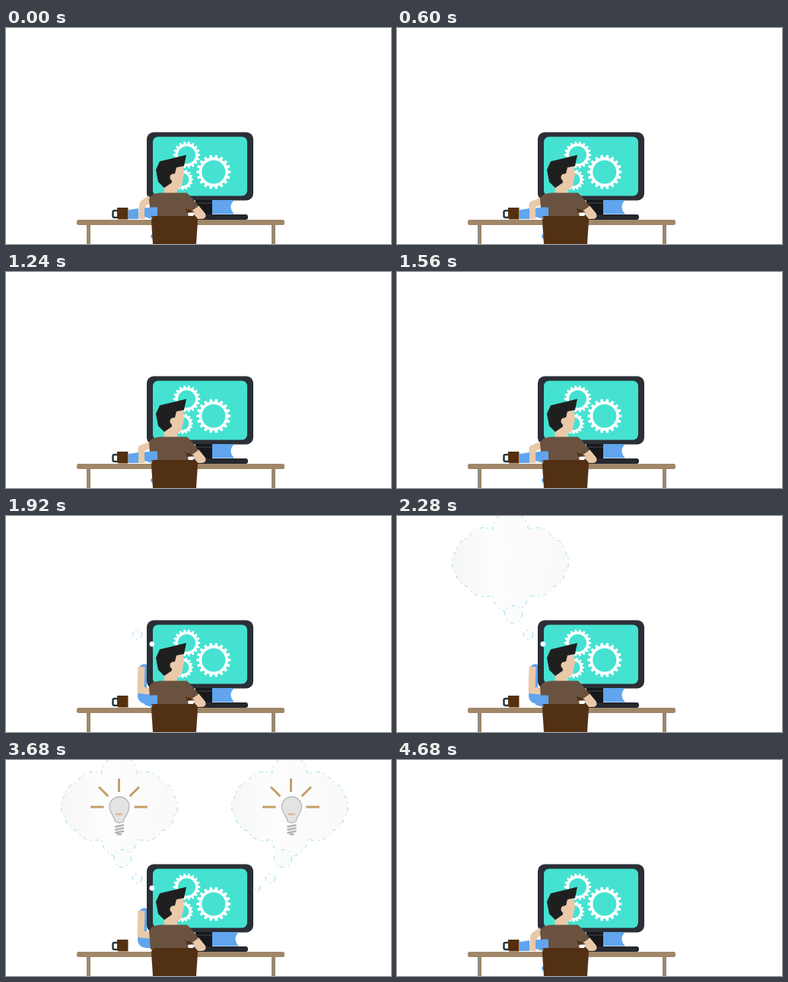
Recreate the animation shown at these times as an HTML page. Size 506x285 px, loop 4720 ms.

```html
<!DOCTYPE html>
<html lang="en">
<head>
<meta charset="utf-8">
<title>Idea at the desk</title>
<style>
html, body { margin: 0; width: 100%; height: 100%; overflow: hidden; background: #fff; }
svg { display: block; width: 100vw; height: 100vh; }
.outline { stroke: #7fd4ea; stroke-width: .8; stroke-dasharray: 5 4 2 6; }
.skin { fill: #e9c9aa; }
.blue { fill: #60a5ee; }
.wood { fill: #a18769; }
#arm { fill: none; stroke: #e9c9aa; stroke-width: 9; stroke-linejoin: round; }
</style>
</head>
<body>
<svg viewBox="0 0 506 285">
  <defs>
    <linearGradient id="mist">
      <stop offset="0" stop-color="#f6f6f6"/>
      <stop offset=".35" stop-color="#fdfdfd"/>
      <stop offset="1" stop-color="#f9f9f9"/>
    </linearGradient>
    <path id="cloud" class="outline" fill="url(#mist)"/>
    <g id="bulb">
      <path d="M143.500 81C143 74 136 71 136 61.500A13 13 0 0 1 162 61.500C162 71 155 74 154.500 81Q149 85 143.500 81Z" fill="#e3e3e3" stroke="#b9b9b9" stroke-width="1.300"/>
      <path d="M144 88L154 86M144 92L154 90M144 96L154 94M147 98H151" stroke="#b2b2b2" stroke-width="2.400" stroke-linecap="round"/>
      <path d="M144 71.500H153" stroke="#dcb98a" stroke-width="2.500"/>
    </g>
    <path id="rays" stroke-width="3"/>
  </defs>

  <use id="cloudL" href="#cloud"/>
  <use id="bulbL" href="#bulb"/>
  <use id="raysL" href="#rays"/>
  <use id="cloudR" href="#cloud" x="224"/>
  <use id="bulbR" href="#bulb" x="226.500"/>
  <use id="raysR" href="#rays" x="226" stroke="#c3a069"/>

  <path id="raisedBlue" class="blue" d="M176 198Q180 194 185 196V225L190 236V248H184Q174 247 173 238Z"/>

  <rect x="185" y="137.500" width="140" height="90" rx="9" fill="#2b2f36"/>
  <rect x="193" y="143.500" width="124" height="78" rx="7" fill="#45e2d1"/>
  <path d="M249 227H271V246H249Z" fill="#16181b"/>
  <path d="M250 231H271" stroke="#34383d" stroke-width="1.500"/>
  <path id="stand" class="blue"/>
  <rect x="246" y="246" width="72" height="7" rx="3" fill="#25282e"/>
  <g id="gears" fill="#fff" fill-rule="evenodd"></g>
  <g id="dots"></g>

  <path class="wood" d="M106 259H111V285H106ZM349 259H354V285H349Z"/>
  <path d="M107 260V285M353.500 260V285" stroke="#7f9299"/>
  <rect class="wood" x="93" y="253" width="273" height="7" rx="2.500"/>

  <rect x="140.500" y="241" width="8" height="9" rx="2" fill="none" stroke="#263a42" stroke-width="2.500"/>
  <path d="M146 237H160.500V252.500H148Q146 252 146 250Z" fill="#54300f"/>

  <path class="skin" d="M207 206L221 185L232 180L234 193L231 208Q229 212 225 212V219H208Z"/>
  <path d="M202 176L237 167.500L234 182L224 184L222 192L217 193L218 204L208 211L200 203L197 187Z" fill="#201f20"/>
  <circle class="skin" cx="219.500" cy="197" r="4"/>
  <path class="skin" d="M240 241L253 234L262 245Q264 251 258 252H251L247 245Z"/>
  <path id="arm"/>
  <path d="M190 250L188 226Q190 218 203 217.500H238Q246 225 253 235L242 243L238 237L240 250Z" fill="#69523f"/>
  <path d="M236 237L248 243L238 244Z" fill="#51301a"/>
  <path id="sleeve" class="blue" d="M182 238Q184 236 199 236.500V248H191V252L182 249Z"/>
  <path id="deskBlue" class="blue" d="M161 240L174 238V252H161ZM193 271Q187 274 193 279Z"/>
  <path d="M191 254Q191 248 197 248H246Q252 248 252 254L250 285H193Z" fill="#523014"/>
</svg>
<script>
const LOOP = 4720, STEP = 40, TYPING = 560;
const THINK = 1680, SECOND = 2840, RESET = 4680;
const $ = id => document.getElementById(id);
const ramp = (t, from, to) => Math.max(0, Math.min(1, (t - from) / (to - from)));
const ease = v => v * v * (3 - 2 * v);
const mix = (a, b, k) => a.map((v, i) => v + (b[i] - v) * k);
const polar = (cx, cy, r, a) => `${cx + r * Math.cos(a)} ${cy + r * Math.sin(a)}`;
const range = n => [...Array(n).keys()];

function add(parent, tag, attrs) {
  const el = document.createElementNS("http://www.w3.org/2000/svg", tag);
  for (const key in attrs) el.setAttribute(key, attrs[key]);
  return $(parent).appendChild(el);
}

function gear(cx, cy, outer, hole, teeth) {
  const root = outer * 0.85, turn = 2 * Math.PI / teeth;
  const rim = range(teeth).flatMap(i => [
    polar(cx, cy, root, (i - .3) * turn), polar(cx, cy, outer, (i - .2) * turn),
    polar(cx, cy, outer, (i + .2) * turn), polar(cx, cy, root, (i + .3) * turn)
  ]);
  const arc = `a${hole} ${hole} 0 1 0`;
  add("gears", "path", {
    d: `M${rim.join("L")}ZM${cx - hole} ${cy}${arc} ${2 * hole} 0${arc} ${-2 * hole} 0Z`
  });
}
gear(237.5, 167.5, 17.8, 11.5, 18);
gear(272.8, 190, 22.6, 15.5, 18);
gear(232, 200, 14, 8.5, 16);

// Round puffs between evenly spaced points on a slightly squared ellipse.
function cloudPath(cx, cy, rx, ry, puffs) {
  const bend = v => Math.sign(v) * Math.abs(v) ** .85;
  const points = range(puffs).map(i => {
    const a = (i + .5) / puffs * 2 * Math.PI;
    return `${cx + rx * bend(Math.cos(a))} ${cy + ry * bend(Math.sin(a))}`;
  });
  return `M${points.at(-1)}` + points.map(p => `A23 23 0 0 1 ${p}`).join("") + "Z";
}
$("cloud").setAttribute("d", cloudPath(149, 61, 74, 44, 12));

$("rays").setAttribute("d", range(5).map(i => {
  const a = Math.PI * (1 + i / 4);
  return `M${polar(148.5, 62, 20, a)}L${polar(148.5, 62, 37.5, a)}`;
}).join(""));

// Each trail grows and curves upward, away from the screen.
function trail(x, dx, start, delay) {
  return range(3).map(i => ({
    start: start + i * delay,
    el: add("dots", "circle", {
      cx: x + i * dx, cy: 169 - 5.5 * i - 7 * i * i, r: 3.4 * 1.83 ** i,
      fill: "#fbfdfd", class: "outline"
    })
  }));
}
const dots = [...trail(192, -19.5, 1800, 120), ...trail(331, 16.5, SECOND, 180)];

// Shoulder, elbow and hand.
const lowArm = [190, 225, 180, 232, 178, 252];
const typingArm = [190, 228, 178, 233, 178, 252];
const raisedArm = [190, 231, 177, 230, 178, 199];

const show = (id, v) => $(id).setAttribute("opacity", Number(v));

function draw(time) {
  const t = Math.floor(time / STEP) * STEP;
  const thinking = t < RESET, second = thinking && t >= SECOND;
  const after = start => thinking && t >= start;

  const lift = thinking ? ease(ramp(t, THINK, THINK + 200)) : 0;
  const phase = t < THINK ? t % TYPING : 0;
  const tap = Math.min(ramp(phase, 0, 40), ramp(phase, TYPING, 480));
  const arm = mix(mix(lowArm, typingArm, tap), raisedArm, lift);
  $("arm").setAttribute("d", `M${arm.join(" ")}`);

  show("deskBlue", lift < .5);
  show("raisedBlue", lift >= .5);
  show("sleeve", !second);
  const edge = second ? 306 : 300;
  $("stand").setAttribute("d", `M271 227H${edge}Q${edge - 9} 236 ${edge} 245.5H271Z`);

  for (const { el, start } of dots) el.setAttribute("opacity", Number(after(start)));
  show("cloudL", thinking && ramp(t, 2120, 2240));
  show("bulbL", thinking && ramp(t, 2280, 2480));
  show("raysL", thinking && ramp(t, 2440, 2640));
  $("raysL").setAttribute("stroke", second ? "#c3a069" : "#dcc093");
  show("cloudR", after(3360));
  show("bulbR", after(3520));
  show("raysR", after(3680));
}

const begin = performance.now();
function tick() {
  draw((performance.now() - begin) % LOOP);
  requestAnimationFrame(tick);
}
tick();
</script>
</body>
</html>
```
